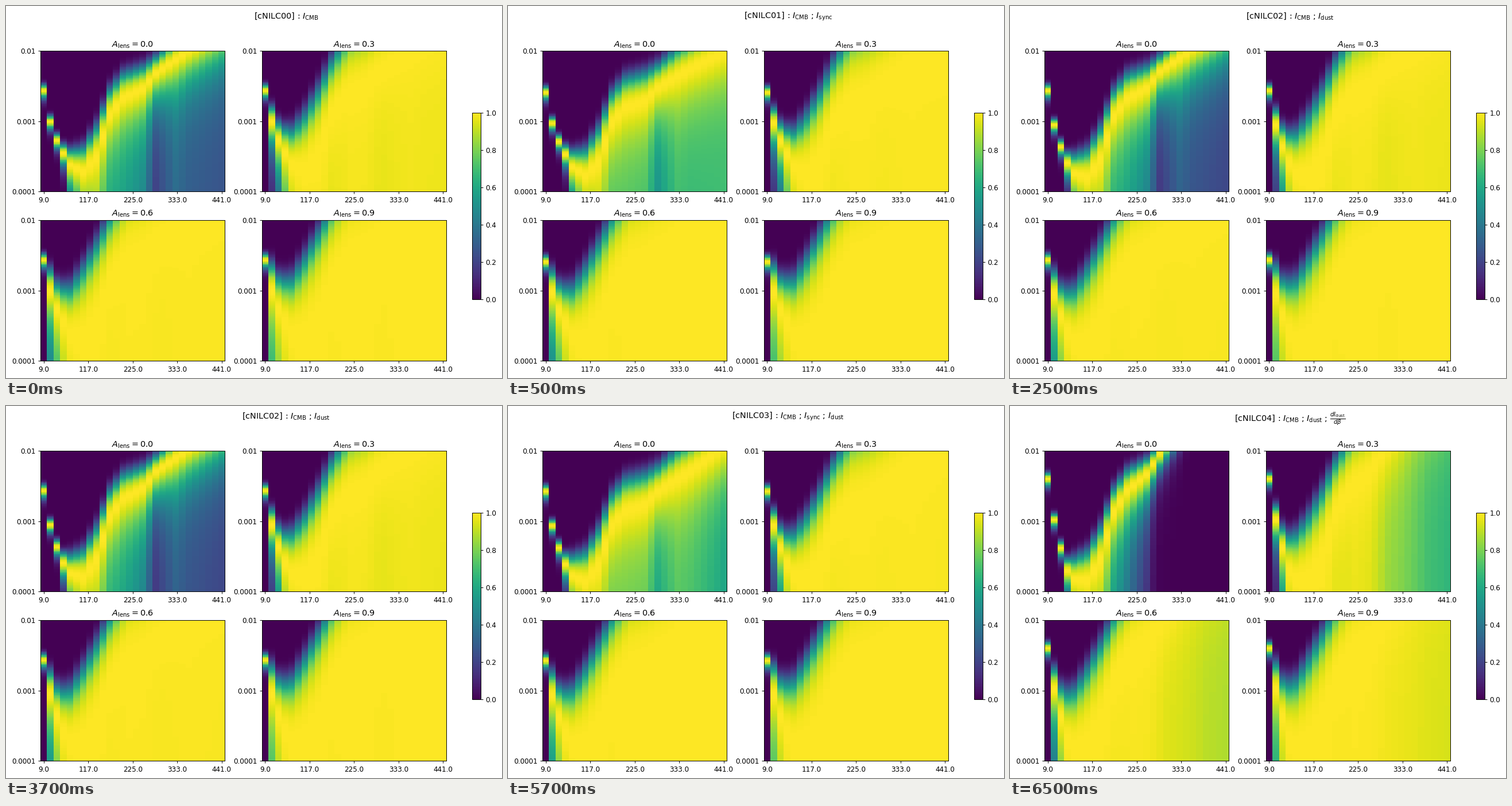
Animation of 864 by 648 pixels, one loop 8 s. Source, as a matplotlib script:

```python
import numpy as np
import matplotlib.pyplot as plt
from matplotlib.animation import FuncAnimation

WIDTH, HEIGHT, DPI = 864, 648, 86.4
COLS = np.arange(28)
A_LENS = (0.0, 0.3, 0.6, 0.9)
ROWS = 100
R = 1e3 * 10 ** (-2 - 2 * (np.arange(ROWS)[:, None] + 0.5) / ROWS)


def curve(points):
    """Log-linear curve over the multipole bins through (bin, value) points."""
    x, y = zip(*points)
    return np.exp(np.interp(COLS, x, np.log(y)))


# Widths and bias are in units of r = 1e-3.
NOISE = curve([(0, 0.01), (2, 0.04), (4, 0.11), (6, 0.17), (8, 0.4), (10, 1.15),
               (12, 1.9), (17, 2.5), (20, 5), (27, 11)])
LENSING = curve([(0, 0.02), (1, 0.95), (2, 0.75), (4, 0.9), (11, 16), (13, 36),
                 (18, 58), (22, 150), (24, 170), (27, 240)])
BIAS = curve([(0, 2.55), (1, 0.93), (2, 0.51), (4, 0.222), (6, 0.168), (8, 0.25),
              (10, 0.95), (12, 1.54), (15, 1.9), (17, 2.98), (22, 5.6), (27, 9.6)])
RELATIVE_WIDTH = 0.16

CMB, SYNC, DUST = (rf"$I_\mathrm{{{name}}}$" for name in ("CMB", "sync", "dust"))
BETA = r"$\frac{dI_\mathrm{dust}}{d\beta}$"

# Each set of components scales the bias by a gain given at a few bins.
GAIN_BINS = (0, 3, 8, 17, 22, 27)
CASES = [
    ((CMB,), (1.06, 1.03, 1.2, 1.6, 1.8, 1.95)),
    ((CMB, SYNC), (1, 1, 1, 1, 1, 1)),
    ((CMB, DUST), (1.06, 0.75, 1.1, 1.68, 1.9, 2.1)),
    ((CMB, SYNC, DUST), (1.04, 0.72, 0.9, 0.88, 0.93, 1.2)),
    ((CMB, DUST, BETA), (1.56, 0.58, 1.1, 3.05, 7.1, 8.5)),
]


def likelihood(gains, a_lens):
    """Gaussian in r for every multipole bin."""
    bias = BIAS * curve(zip(GAIN_BINS, gains))
    width = np.hypot(NOISE, RELATIVE_WIDTH * bias) + a_lens * LENSING
    return np.exp(-0.5 * ((R - bias) / width) ** 2)


MAPS = [[likelihood(gains, a) for a in A_LENS] for _, gains in CASES]
TITLES = [f"[cNILC{i:02d}] : " + " ; ".join(parts)
          for i, (parts, _) in enumerate(CASES)]

fig = plt.figure(figsize=(WIDTH / DPI, HEIGHT / DPI), dpi=DPI)


def add_axes(left, top, right, bottom):
    return fig.add_axes([left / WIDTH, 1 - bottom / HEIGHT,
                         (right - left) / WIDTH, (bottom - top) / HEIGHT])


images = []
for i, a in enumerate(A_LENS):
    left = (60.2, 445.7)[i % 2]
    top = (78.4, 373.2)[i // 2]
    ax = add_axes(left, top, left + 321.2, top + 245)
    images.append(ax.imshow(MAPS[0][i], vmin=0, vmax=1, cmap="viridis",
                            aspect="auto", interpolation="nearest",
                            extent=(1, 449, -4, -2)))
    ax.set_title(rf"$A_\mathrm{{lens}} = {a}$")
    ticks = np.arange(9, 442, 108)
    ax.set_xticks(ticks, [f"{t:.1f}" for t in ticks])
    ax.set_yticks([-4, -3, -2], ["0.0001", "0.001", "0.01"])

fig.colorbar(images[0], cax=add_axes(811.7, 186.2, 827.3, 510.7))
title = fig.text(488 / WIDTH, 1 - 9 / HEIGHT, TITLES[0], size=12,
                 ha="center", va="top")


def update(frame):
    # The first state lasts one step, the following ones four.
    state = (frame + 3) // 4
    for image, data in zip(images, MAPS[state]):
        image.set_data(data)
    title.set_text(TITLES[state])
    return [*images, title]


anim = FuncAnimation(fig, update, frames=16, interval=500, repeat=True,
                     repeat_delay=0, blit=False)
plt.show()
```
